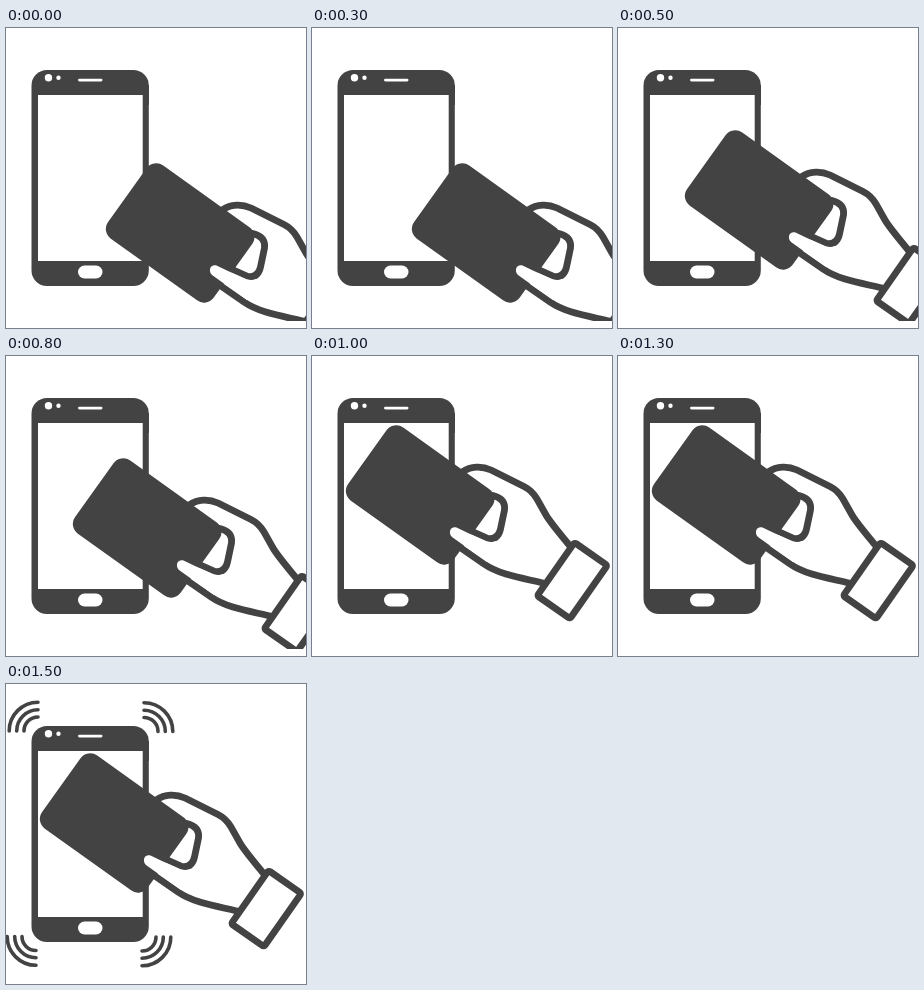
Recreate the animation shown at these times as an HTML page. Size 300 by 300 pixels, loop 2 s.

```html
<!DOCTYPE html>
<html lang="en">
<head>
<meta charset="utf-8">
<title>Tap to pay</title>
<style>
  html, body { margin: 0; width: 100%; height: 100%; overflow: hidden; background: #fff; }
  svg { display: block; width: 100vw; height: 100vh; }
  .dark { fill: #434343; }
  .white { fill: #fff; }
  .line { fill: none; stroke: #434343; stroke-width: 6.8; stroke-linecap: round; stroke-linejoin: round; }
  .cuff { fill: #fff; }
  .wave { stroke-width: 3.6; }
</style>
</head>
<body>
<svg viewBox="0 0 300 300">
  <clipPath id="stage"><rect width="300" height="293"/></clipPath>

  <g id="phone">
    <rect class="dark" x="25.5" y="42" width="117.3" height="216" rx="15.500"/>
    <rect class="dark" x="140" y="57" width="3" height="20"/>
    <rect class="white" x="32" y="67" width="104.7" height="166"/>
    <circle class="white" cx="42.5" cy="49.7" r="3.7"/>
    <circle class="white" cx="52.5" cy="49.7" r="2.2"/>
    <rect class="white" x="72" y="50.7" width="24.5" height="2.8" rx="1.4"/>
    <rect class="white" x="72" y="237.5" width="24.5" height="13" rx="6.5"/>
  </g>

  <g id="waves"></g>

  <g clip-path="url(#stage)">
    <g id="hand">
      <path class="white" d="M150 116C159 110 170 110 179 114L212 130.500Q220 134.500 225 143L234 159Q238 166 258 190L231 227C210 222 188 219 172 208L146 190Z"/>
      <path class="line" d="M150 116C159 110 170 110 179 114L212 130.500Q220 134.500 225 143L234 159Q238 166 258 190M146 190L172 208C188 219 210 222 231 227"/>
      <rect class="dark" width="130" height="90" rx="12" transform="translate(81.5 64.5) rotate(35.6)"/>
      <path class="line" d="M181 139.500Q194 143 192.500 154L188.500 173Q186 184 176 182.500L157 174"/>
      <path class="white" d="M144.500 171.500L156 177L174.600 185.300Q180 187 184 185L190 200L175 206L140 181C136 177 138 170 144.500 171.500Z"/>
      <rect class="line cuff" width="40" height="65" rx="2" transform="translate(262.5 186.5) rotate(35)"/>
    </g>
  </g>
</svg>
<script>
  const hand = document.getElementById('hand');
  const waves = document.getElementById('waves');

  // Quarter arcs around each corner; sx and sy point outwards.
  const corners = [[32, 47, -1, -1], [138, 47.5, 1, -1], [30, 252.5, -1, 1], [136, 253, 1, 1]];
  const arc = (x, y, sx, sy, r) =>
    `<path class="line wave" d="M${x + sx * r} ${y}A${r} ${r} 0 0 ${sx === sy ? 1 : 0} ${x} ${y + sy * r}"/>`;
  waves.innerHTML = corners.map(corner =>
    [14, 21.3, 28.8].map(r => arc(...corner, r)).join('')
  ).join('');

  const start = performance.now();
  function draw(now) {
    const step = Math.floor((Math.max(0, now - start) % 2000) / 500);
    const shift = 33 * Math.max(0, 2 - step);
    hand.setAttribute('transform', `translate(${shift} ${shift})`);
    waves.setAttribute('visibility', step === 3 ? 'visible' : 'hidden');
    requestAnimationFrame(draw);
  }
  draw(start);
</script>
</body>
</html>
```
